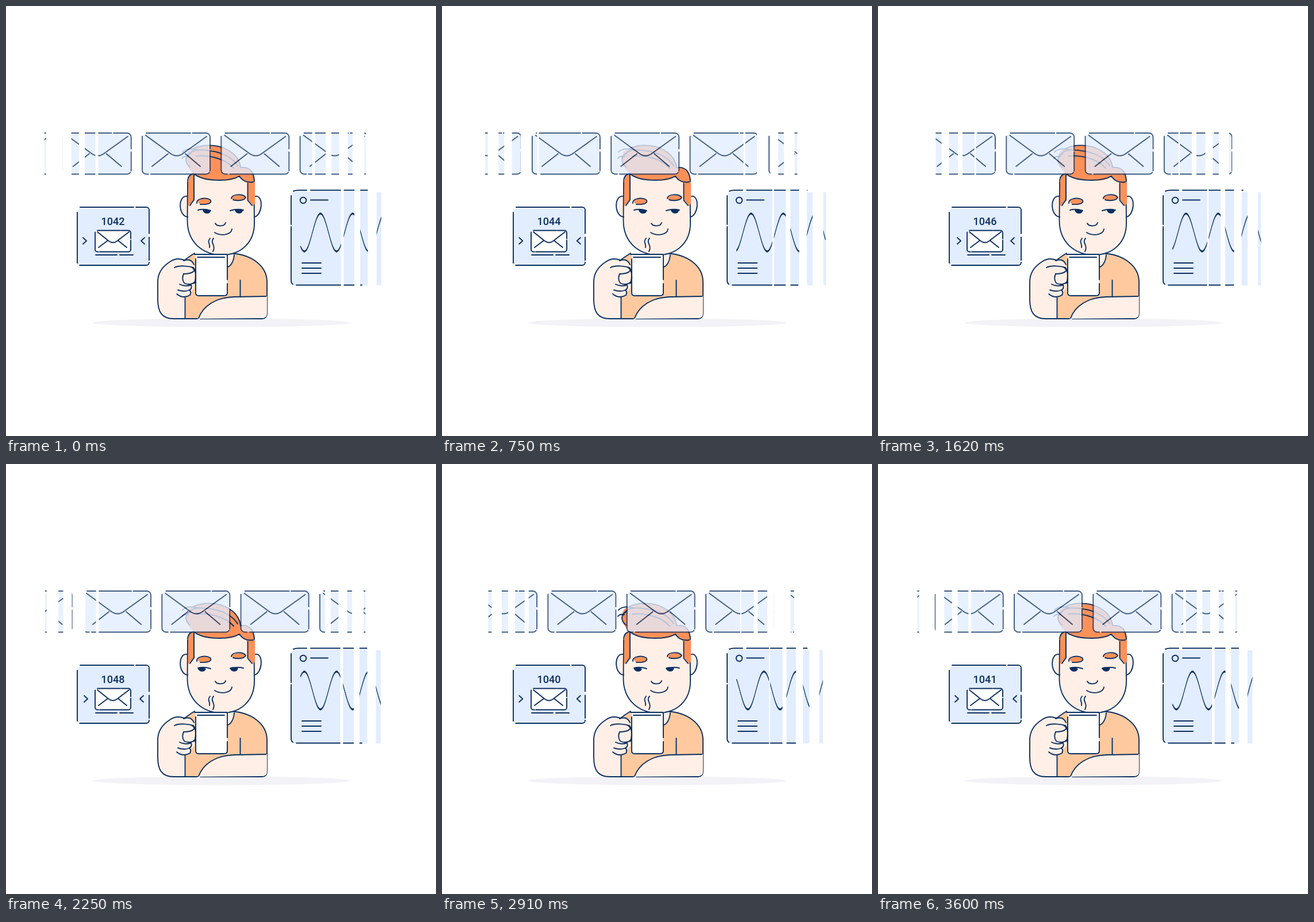
Animation, 748 px wide and 748 px high, one loop 3.63 s. Source, as an HTML page:

```html
<!DOCTYPE html>
<html lang="en">
<head>
<meta charset="utf-8">
<title>Mail over coffee</title>
<style>
  html, body { margin: 0; width: 100%; height: 100%; overflow: hidden; background: #fff; }
  svg { display: block; width: 748px; height: 748px; }
  .ln { fill: none; stroke: #0b2f61; stroke-width: 1.9; stroke-linecap: round; stroke-linejoin: round; }
  .skin { fill: #ffefe6; }
  .shirt { fill: #ffc99f; }
  .hair { fill: #ff9158; }
  .blue { fill: #e2edff; }
  .white { fill: #fff; }
  .ink { fill: #0b2f61; }
  .frame { stroke-dasharray: 21 .9 15 1.5 9 .8 28 1.2 20 2.6; }
  text { font: 500 18px Roboto, sans-serif; text-anchor: middle; }
</style>
</head>
<body>
<svg viewBox="0 0 748 748">
  <defs>
    <clipPath id="stripClip"><path id="stripBars"/></clipPath>
    <clipPath id="chartClip"><path id="chartBars"/></clipPath>
    <g id="mail">
      <rect class="blue" x="1" y="222" width="116" height="70" rx="6"/>
      <rect class="ln frame" pathLength="100" y="221" width="118" height="71.5" rx="7"/>
      <path class="ln" d="M6 225 47 255Q60 266 73 255L112 227M17 279 45 257M75 257 101 279"/>
    </g>
  </defs>

  <ellipse cx="374" cy="551" rx="224" ry="7.5" fill="#f2f2f7"/>

  <g id="body">
    <path class="shirt" d="M311 544V500L306 446Q316 437 328 431H387C425 430 455 452 455 482V506L400 507C364 508 342 525 335 544Z"/>
    <path class="skin" d="M385 430H398C397 443 392 452 385 455Z"/>
    <path class="ln" d="M308 444Q317 437 328 430M388 430C428 431 454 453 454 480V535Q454 544 445 544H338M397 433C396 445 391 452 386 454M407.500 477V505M333 544H300"/>
    <path class="skin" d="M335 544C343 522 364 507 397 507L454 505V535Q454 543 445 543Z"/>
    <path class="ln" d="M335 543C343 522 364 507 397 506L452 505"/>
    <path class="skin" d="M312 543H292C270 543 264 531 264 510V480C264 462 274 450 284 446Q295 438 308 442L328 455V490L311 508Z"/>
    <path class="ln" d="M312 544H292C270 544 264 531 264 510V480C264 462 274 452 285 445Q296 437 310 442M311.500 507V543"/>
  </g>

  <g id="head">
    <path class="skin" d="M317 331C298 327 299 366 318 367ZM431 331C450 327 447 366 430 367Z"/>
    <path class="ln" d="M315 331C299 329 299 365 316 367M434 331C449 329 446 366 431 367"/>
    <path class="skin" d="M318 300H432V378C431 412 408 432 376 432C341 432 318 413 317 374Z"/>
    <path class="ln" d="M316 306 315.500 374C316 411 342 433 376 433C409 433 432 411 432 378L431.500 318"/>
    <path class="hair" d="M317 348V306Q317 293 328 290V338ZM421 300V337L430 348 433 343V300Z"/>
    <path class="ln" d="M316 304Q317 293 327 291V337L320 347M420.500 306V338L428 347"/>
    <path class="hair" d="M327 291C315 282 309 268 316 254C329 241 357 239 376 246C397 253 407 266 410 281C423 278 434 289 432 307C422 312 410 304 406 296C396 306 376 304 358 303C342 302 332 298 327 291Z"/>
    <path class="ln" d="M326 291C342 306 388 306 406 296C411 304 420 308 430 306M410 281C424 280 431 288 432 305M326 248C342 240 366 241 381 248C397 255 406 267 408 281M315 263C322 246 344 250 362 253C382 257 396 267 403 278M306 265Q310 260 317 262M307 254Q315 246 332 250M320 280C310 272 311 261 321 257M331 261C355 259 382 266 396 282"/>
    <ellipse class="hair" cx="345" cy="340.500" rx="11" ry="5"/>
    <ellipse class="hair" cx="405" cy="334" rx="12" ry="4.500"/>
    <path class="ln" d="M332 343C331 335 347 332 355 337C360 342 352 346 338 345M392 335C392 327 412 326 417 333C415 339 401 339 395 337"/>
    <path class="ln" d="M334 355Q344 352 356 356M390 356Q402 352 413 355"/>
    <g id="eyes" class="ink">
      <path d="M342 354.500Q349 352 356 356C356 363 343 363 342 354.500Z"/>
      <path d="M398 354.500Q405 352 412 355C412 363 399 363 398 354.500Z"/>
    </g>
    <path class="ln" d="M364 378C367 384 380 384 382 377M363 394C374 401 392 398 393 388"/>
  </g>

  <g id="mug">
    <path class="white" d="M330 432H384L385 500Q385 505 380 505H334Q329 505 329 500Z"/>
    <path class="ln" d="M328 432H383Q385 432 385 435V476M385 483V499Q385 504 379 504H335Q330 504 330 499V440M333 437H380"/>
    <path class="skin" d="M309 444Q324 439 327 449Q331 460 321 464L327 481Q322 485 320 486Q322 493 316 495Q322 499 317 505Q305 508 297 502L290 460Z"/>
    <path class="ln" d="M309 443Q322 438 327 450M293 455C302 450 320 453 326 455C331 460 325 466 309 466M309 466Q305 475 310 482C318 486 326 483 328 480M302 484Q312 489 322 485M299 494Q311 498 319 494M297 501Q308 510 320 503M322 485Q324 492 319 494Q323 498 320 503"/>
    <path class="ink" d="M322 455Q332 455 331 468Q332 483 326 484Q329 478 329 468Q329 459 322 455Z"/>
    <path class="ln" d="M355 404C349 411 356 414 354 420M361 404C354 412 366 416 360 427"/>
  </g>

  <g clip-path="url(#stripClip)" opacity=".78"><g id="strip"></g></g>

  <g id="counter">
    <rect class="blue" x="125" y="352" width="123" height="98" rx="4"/>
    <rect class="ln frame" pathLength="100" x="124" y="350" width="125" height="101" rx="5"/>
    <rect class="white" x="155" y="391" width="62" height="37" rx="4"/>
    <rect class="ln frame" pathLength="100" x="155" y="390.500" width="62" height="37" rx="4"/>
    <path class="ln" d="M159 393 179 409Q186 414 193 409L214 393M161 420 177 408M195 408 210 420M156 433H193M198 433H221"/>
    <text id="count" class="ink" x="186" y="381">1042</text>
    <path id="arrowL" class="ln" d="M134 403 140 408.500 134 414"/>
    <path id="arrowR" class="ln" d="M241 403 235 408.500 241 414"/>
  </g>

  <g clip-path="url(#chartClip)">
    <path class="blue" d="M502 323H630V324H668V486H503Q497 486 497 480V328Q497 323 502 323Z"/>
    <path class="ln" d="M500 322Q504 320.500 508 320.500H523M530 320.500H635M496 330V380M496 384V477Q496 482 499 484M505 485.500H619"/>
    <circle class="ln" cx="517" cy="338" r="5.300"/>
    <path class="ln" d="M530 337.500H560M515 447H548M515 456H548M515 465H548"/>
    <path id="wave" class="ink" stroke="#0b2f61" stroke-width=".9"/>
  </g>
</svg>

<script>
const LOOP = 3630, STEP = 30, CYCLE = 3600;
const PITCH = 137.3, WAVELENGTH = 56;
const $ = id => document.getElementById(id);

const strip = $('strip');
for (let i = -3; i < 4; i++) {
  strip.insertAdjacentHTML('beforeend', `<use href="#mail" x="${237 + i * PITCH}"/>`);
}

// Bars drift outward and grow thinner; p is the phase from 0 to 1.
const outer = u => 606 + 23.4 * u;
const inner = u => 587.5 + 28.6 * u;

function bars(p) {
  const list = [[380, outer(p - 2)]];
  for (let k = -1; k < 4; k++) {
    const l = inner(k + p), r = outer(k + p);
    if (r > l) list.push([l, r]);
  }
  return list;
}

const toPath = (list, min, max) => list
  .map(([l, r]) => [Math.max(l, min), Math.min(r, max)])
  .filter(([l, r]) => r > l)
  .map(([l, r]) => `M${l} 200H${r}V500H${l}Z`)
  .join('');

function wavePath(shift) {
  const top = [], bottom = [];
  for (let x = 512.5; x <= 668; x += 1.5) {
    const c = Math.cos((x - 547 - shift) / WAVELENGTH * 2 * Math.PI);
    top.push(`${x} ${394 - 34.2 * c}`);
    bottom.unshift(`${x} ${394 - 31.6 * c}`);
  }
  return `M${top.join('L')}L${bottom.join('L')}Z`;
}

function draw(t) {
  const turn = t / CYCLE;
  strip.setAttribute('transform', `translate(${turn * 2 * PITCH % PITCH})`);

  const right = bars(t * 8 / LOOP % 1);
  const near = right.map(([l, r]) => [l - 50, r - 50]);
  const mirrored = near.map(([l, r]) => [693 - r, 693 - l]);
  $('chartBars').setAttribute('d', toPath(right, 380, 668));
  $('stripBars').setAttribute('d', toPath([...near, ...mirrored], 66.5, 630));
  $('wave').setAttribute('d', wavePath(turn * 4 * WAVELENGTH));

  const push = 2 - 2 * Math.cos(turn * 20 * Math.PI);
  $('arrowL').setAttribute('transform', `translate(${push})`);
  $('arrowR').setAttribute('transform', `translate(${-push})`);

  const ticks = Math.min(9, Math.floor(t / 360));
  $('count').textContent = '104' + (2 + ticks) % 10;
  $('eyes').setAttribute('transform', `translate(${t < LOOP / 2 ? 0 : -8.5})`);
}

const start = performance.now();
function tick() {
  const t = (performance.now() - start) % LOOP;
  draw(Math.floor(t / STEP) * STEP);
  requestAnimationFrame(tick);
}
tick();
</script>
</body>
</html>
```
